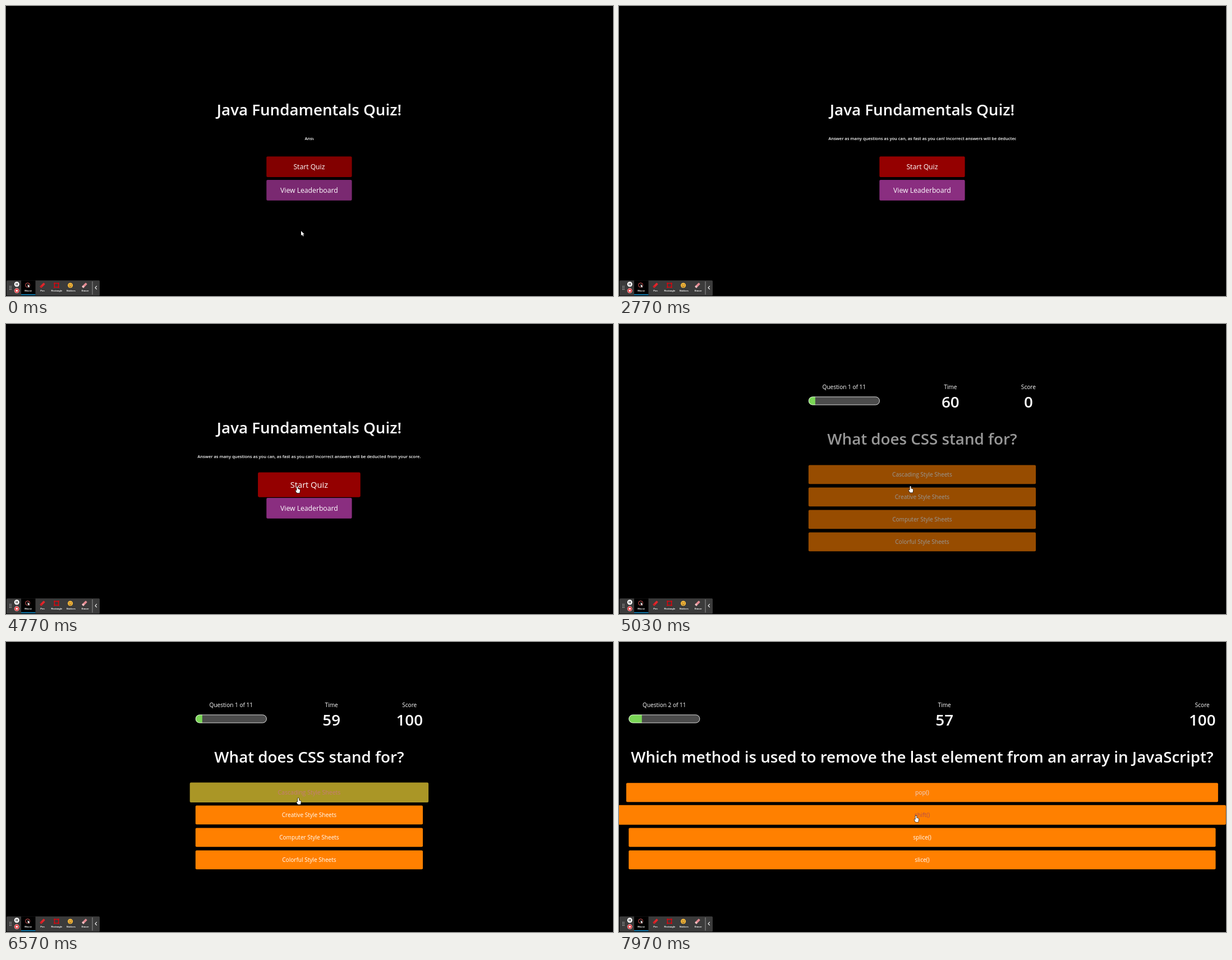
Animation of 1082x517 px, one loop 8000 ms. Source, as an HTML page with a canvas:

```html
<!DOCTYPE html>
<html lang="en">
<head>
<meta charset="utf-8">
<title>Quiz</title>
<style>
html, body { margin: 0; width: 100%; height: 100%; overflow: hidden; background: #000; }
canvas { display: block; }
</style>
</head>
<body>
<canvas id="stage" width="1082" height="517"></canvas>
<script>
const ctx = document.getElementById('stage').getContext('2d');
const LOOP = 8000, CX = 540.4;
const SANS = '"Open Sans", "Noto Sans", sans-serif';
const WHITE = [255, 255, 255], ORANGE = [255, 128, 0], GREEN = [76, 175, 80], RED = [148, 0, 0], PURPLE = [138, 46, 128];
const QUIZ = 4860, CLICK = 6430, NEXT = 7430;

const QUESTIONS = [
  { title: 'What does CSS stand for?', width: 405.2,
    options: ['Cascading', 'Creative', 'Computer', 'Colorful'].map(s => s + ' Style Sheets') },
  { title: 'Which method is used to remove the last element from an array in JavaScript?', width: 1046.2,
    options: ['pop()', 'shift()', 'splice()', 'slice()'] }
];

// time, x, y of the pointer tip
const PATH = [
  [0, 526, 401], [1000, 397, 306], [3400, 397, 306], [3750, 512, 290], [3980, 515, 300],
  [4100, 517.5, 319], [4180, 517.5, 322], [4400, 519, 291], [5030, 519.5, 289], [5100, 519.5, 289],
  [5350, 521, 278], [7560, 521, 278], [7990, 529.5, 309.5]
];
const ARROW = new Path2D('M0 0V8.2L1.9 6.5L3.3 9.6L4.7 9L3.4 6H5.8Z');
const HAND = new Path2D('M-1 .8Q0 -.6 1 .8V4.2L4.2 5.2Q5 5.6 4.8 7L4 11.6H-.8L-3 7.8Q-3.2 6.4 -2 6.7L-1 7.6Z');

const clamp = v => Math.min(1, Math.max(0, v));
const mix = (a, b, k) => a.map((v, i) => v + (b[i] - v) * k);
const rgb = c => `rgb(${c.map(Math.round)})`;

// cubic-bezier(.25, .1, .25, 1)
function ease(x) {
  let lo = 0, hi = 1, u = 0;
  for (let i = 0; i < 20; i++) {
    u = (lo + hi) / 2;
    if (.75 * u * (1 - u) + u ** 3 < x) lo = u; else hi = u;
  }
  return .3 * u * (1 - u) ** 2 + 3 * u * u * (1 - u) + u ** 3;
}
const ramp = (t, start, length = 500) => {
  const k = clamp((t - start) / length);
  return k === 0 || k === 1 ? k : ease(k);
};

function text(s, x, y, size, weight = 400, color = '#fff', align = 'center', family = SANS) {
  ctx.font = `${weight} ${size}px ${family}`;
  ctx.textAlign = align;
  ctx.fillStyle = color;
  ctx.fillText(s, x, y);
}

function box(x, y, w, h, fill, r = 0) {
  ctx.fillStyle = fill;
  ctx.beginPath();
  ctx.roundRect(x, y, w, h, r);
  ctx.fill();
}

function disc(x, y, r, fill) {
  ctx.fillStyle = fill;
  ctx.beginPath();
  ctx.arc(x, y, r, 0, 7);
  ctx.fill();
}

function line(color, width, ...points) {
  ctx.strokeStyle = color;
  ctx.lineWidth = width;
  ctx.beginPath();
  points.forEach(p => ctx.lineTo(...p));
  ctx.stroke();
}

function button(y, w, h, scale, fill, label, size, color = WHITE) {
  ctx.save();
  ctx.translate(CX, y);
  ctx.scale(scale, scale);
  box(-w / 2, -h / 2, w, h, rgb(fill), 2);
  text(label, 0, size * .355, size, 400, rgb(color));
  ctx.restore();
}

function home(t) {
  text('Java Fundamentals Quiz!', CX, 195, 27.72, 600);

  const intro = 'Answer as many questions as you can, as fast as you can! Incorrect answers will be deducted from your score.';
  ctx.font = `600 7.56px ${SANS}`;
  const w = ctx.measureText(intro).width * Math.min(50, Math.floor((t + 205) / 70)) / 50;
  ctx.save();
  ctx.beginPath();
  ctx.rect(CX - w / 2, 228, w, 16);
  ctx.clip();
  text(intro, CX - w / 2, 239, 7.56, 600, '#fff', 'left');
  ctx.restore();

  const start = ramp(t, 3600) - ramp(t, 4020) + ramp(t, 4300);
  const board = ramp(t, 4040) - ramp(t, 4280);
  const lit = .88 + .12 * clamp(t / 250);
  button(286.6, 152.3, 36.8, 1 + .2 * start, mix([0, 0, 0], RED, lit), 'Start Quiz', 12.2);
  button(328.4, 152.3, 36.8, 1 + .2 * board, mix([0, 0, 0], PURPLE, lit), 'View Leaderboard', 12.2);
}

function hud(t, left, right, n) {
  const barW = 127, h = 15, y = 129.5;
  text(`Question ${n} of 11`, left + barW / 2, 116, 10.08);
  ctx.save();
  ctx.beginPath();
  ctx.roundRect(left, y, barW, h, h / 2);
  ctx.clip();
  box(left, y, barW, h, '#4b4b4b');
  box(left, y, .6 + 125.8 * n / 11, h, '#7ad656');
  ctx.restore();
  ctx.strokeStyle = '#fff';
  ctx.lineWidth = .8;
  ctx.beginPath();
  ctx.roundRect(left + .4, y + .4, barW - .8, h - .8, h / 2);
  ctx.stroke();

  const score = t < CLICK ? 0 : 100;
  const scoreW = score ? 47.5 : 26.3, timeW = 31.7;
  const gap = (right - left - barW - timeW - scoreW) / 2;
  const timeX = left + barW + gap + timeW / 2, scoreX = right - scoreW / 2;
  text('Time', timeX, 116, 10.08);
  text(60 - Math.floor((t - QUIZ) / 1000), timeX, 149, 27.72, 600);
  text('Score', scoreX, 116, 10.08);
  text(score, scoreX, 149, 27.72, 600);
}

function quiz(t) {
  const n = t < NEXT ? 1 : 2, q = QUESTIONS[n - 1];
  hud(t, CX - q.width / 2, CX + q.width / 2, n);
  text(q.title, CX, 215, 27.72, 600);

  const hover = [ramp(t, 5240) - ramp(t, 7705), ramp(t, 7765), 0, 0];
  const correct = ramp(t, CLICK) - ramp(t, NEXT);
  q.options.forEach((label, i) => {
    const right = i ? 0 : correct;
    const color = mix(mix(WHITE, RED, hover[i]), WHITE, right);
    button(268.3 + 40 * i, q.width, 33.7, 1 + .05 * hover[i], mix(ORANGE, GREEN, right), label, 10.08, color);
  });

  const dark = 1 - ramp(t, QUIZ);
  if (dark > 0) box(300, 180, 480, 240, `rgba(0,0,0,${dark})`);
}

function slab(x, y, color, tip) {
  ctx.save();
  ctx.translate(x, y);
  ctx.rotate(-Math.PI / 4);
  box(-5, -2, 10, 4, color, 1);
  box(-5, -2, 3, 4, tip, 1);
  ctx.restore();
}

function toolbar() {
  box(1, 489.3, 166, 27, '#3b3b3b', 1.5);
  box(27, 489.3, 25.5, 27, '#000');
  box(27, 513.8, 25.5, 1.6, '#1595d3');
  for (let i = 0; i < 6; i++) box(6 + i % 2 * 2.4, 499 + (i >> 1) * 2.8, 1.3, 1.3, '#bbb');

  disc(19.2, 496, 4.5, '#fff');
  box(17.4, 494, 1.2, 4, '#333');
  box(19.8, 494, 1.2, 4, '#333');
  disc(19.2, 507.6, 4.5, '#f3c4c4');
  disc(19.2, 507.6, 3.8, '#e03a40');
  box(17.6, 506, 3.2, 3.2, '#fff', .4);

  ctx.strokeStyle = '#e8605f';
  ctx.lineWidth = 1;
  ctx.beginPath();
  ctx.arc(38.6, 497.6, 3.9, 0, 7);
  ctx.stroke();
  pointer(ARROW, 38.8, 496, .65);
  slab(65, 498, '#e3262b', '#c81e24');
  ctx.strokeStyle = '#d9060f';
  ctx.lineWidth = 1.5;
  ctx.strokeRect(86.4, 494.4, 7.2, 7);
  for (const x of [86.4, 93.6]) for (const y of [494.4, 501.4]) box(x - 1.1, y - 1.1, 2.2, 2.2, '#d9060f');
  disc(114.6, 498, 4.6, '#f6b93b');
  disc(113, 497, .7, '#5a3510');
  disc(116.2, 497, .7, '#5a3510');
  line('#5a3510', .9, [112.4, 499.4], [114.6, 500.6], [116.8, 499.4]);
  slab(140, 498, '#e58a92', '#f3c3c6');

  ['Mouse', 'Pen', 'Rectangle', 'Stickers', 'Eraser'].forEach((s, i) =>
    text(s, 39.7 + 25.35 * i, 509.2, 4.15, 700, '#fff', 'center', '"Liberation Sans", Arial, sans-serif'));
  line('#aaa', .8, [154, 491], [154, 514.5]);
  line('#fff', 1.1, [161.8, 499.2], [159, 502.2], [161.8, 505.2]);
}

function pointer(shape, x, y, scale = 1) {
  ctx.save();
  ctx.translate(x, y);
  ctx.scale(scale, scale);
  ctx.strokeStyle = '#000';
  ctx.lineWidth = 1.2;
  ctx.stroke(shape);
  ctx.fillStyle = '#fff';
  ctx.fill(shape);
  ctx.restore();
}

function mouse(t) {
  if (t > 1900 && t < 3400) return;
  const i = Math.max(1, PATH.findIndex(p => p[0] > t));
  const a = PATH[i - 1], b = t >= 7990 ? a : PATH[i];
  if (t >= 7990) return pointer(HAND, 529.5, 309.5);
  const k = clamp((t - a[0]) / (b[0] - a[0]));
  const [, x, y] = mix(a, b, k * k * (3 - 2 * k));
  pointer(t < 3600 ? ARROW : HAND, x, y);
}

function draw(now) {
  const t = now % LOOP;
  box(0, 0, 1082, 517, '#000');
  (t < QUIZ ? home : quiz)(t);
  toolbar();
  mouse(t);
}

const began = performance.now();
function tick() {
  draw(performance.now() - began);
  requestAnimationFrame(tick);
}
tick();
</script>
</body>
</html>
```
